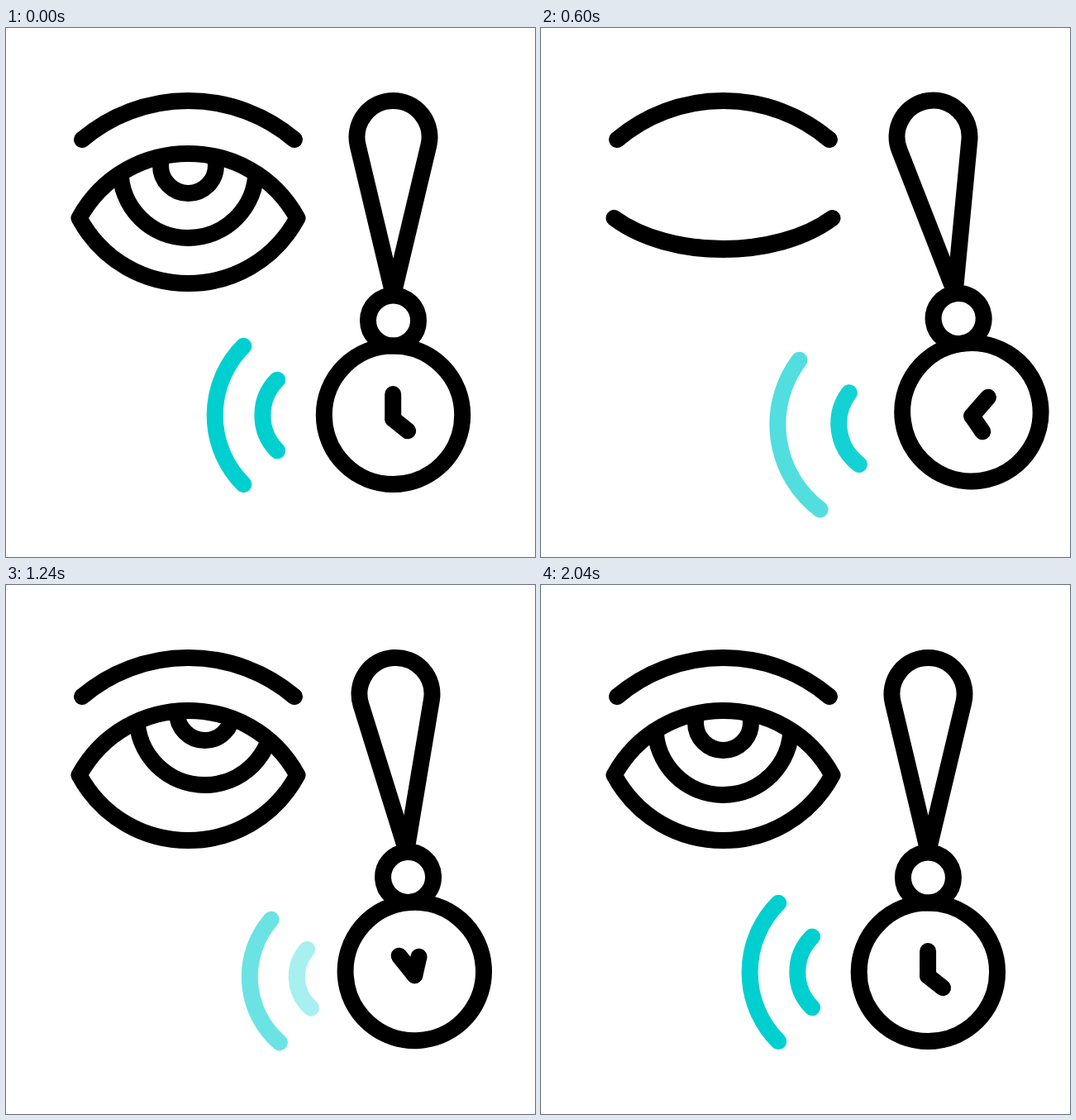
Animation of 640 by 640 pixels, one loop 2120 ms. Source, as an HTML page:

```html
<!DOCTYPE html>
<html lang="en">
<head>
<meta charset="utf-8">
<title>Hypnosis</title>
<style>
  html, body { margin: 0; width: 100%; height: 100%; overflow: hidden; background: #fff; }
  svg { display: block; width: 100%; height: 100%; }
  .line { fill: none; stroke: #000; stroke-width: 20; stroke-linecap: round; stroke-linejoin: round; }
  .wave { stroke: #00cfd0; }
</style>
</head>
<body>
<svg viewBox="0 0 640 640">
  <defs><clipPath id="opening"><path id="openingPath"/></clipPath></defs>

  <path class="line" d="M92 135A199 199 0 0 1 349 135"/>
  <g clip-path="url(#opening)">
    <g id="iris" class="line">
      <circle cx="220.5" cy="172" r="82"/>
      <circle cx="220.5" cy="166.5" r="33.5"/>
    </g>
  </g>
  <path id="lids" class="line"/>

  <g id="pendulum" class="line">
    <path id="outer" class="wave"/>
    <path id="inner" class="wave"/>
    <path d="M468.5 322L425.7 142.2A44 44 0 1 1 511.3 142.2Z"/>
    <circle cx="468.5" cy="354" r="30.5"/>
    <circle cx="468.5" cy="468.3" r="83.7"/>
    <path id="minute" d="M468.2 473V443"/>
    <path id="hour" d="M468.2 473L486.2 487.3"/>
  </g>
</svg>
<script>
  const LOOP = 2120, STEP = 40, REST = 2040;
  const el = id => document.getElementById(id);
  const clamp = x => Math.min(1, Math.max(0, x));
  const mix = (a, b, k) => a + (b - a) * k;
  const smooth = x => x * x * (3 - 2 * x);
  const inOut = (x, p) => x < .5 ? (2 * x) ** p / 2 : 1 - (2 - 2 * x) ** p / 2;

  // Rows: time, easing power of the segment leading here, degrees
  const SWING = [[0, 2, 0], [468, 2, 10], [894, 3, -7.5], [1320, 3, 4.2], [1740, 3, -3], [2080, 3, 0]];
  // Rows: time, x, y
  const GAZE = [[0, 0, 0], [400, 15.5, -11], [960, -44, -9.5], [1240, 20, -12], [1600, 0, 0]];
  const BLINKS = [598, 1587], BLINK_HALF = 150;
  const WAVES = [
    { id: 'outer', r: 118.3, leave: 475, enter: 950 },
    { id: 'inner', r: 60.6, leave: 570, enter: 1070 }
  ];

  function segment(rows, t) {
    let i = 1;
    while (i < rows.length - 1 && t > rows[i][0]) i++;
    const a = rows[i - 1], b = rows[i];
    return { a, b, x: clamp((t - a[0]) / (b[0] - a[0])) };
  }

  function drawEye(t) {
    const shut = Math.max(...BLINKS.map(m => smooth(clamp(1 - Math.abs(t - m) / BLINK_HALF))));
    const lid = sag => 230 + sag * 4 / 3;
    const dx = mix(57.3, 68, shut);
    const up = lid(mix(-78, 37, shut)), low = lid(mix(79, 38, shut));
    const left = 88.5 + dx, right = 352.5 - dx;
    const d = `M88.5 230C${left} ${up} ${right} ${up} 352.5 230C${right} ${low} ${left} ${low} 88.5 230Z`;
    el('lids').setAttribute('d', d);
    el('lids').style.fill = shut > .85 ? '#000' : 'none';
    el('openingPath').setAttribute('d', d);

    const { a, b, x } = segment(GAZE, t), k = smooth(x);
    el('iris').setAttribute('transform', `translate(${mix(a[1], b[1], k)} ${mix(a[2], b[2], k)})`);
  }

  // Waves spread away from the watch, then grow back about a point between arcs and watch
  function drawWave({ id, r, leave, enter }, t) {
    const out = clamp((t - leave) / 390), back = clamp((t - enter) / 500);
    const returning = t >= enter;
    const scale = returning ? mix(.74, 1, back) : 1 + .286 * out;
    const pivot = returning ? 400 : 468.5;
    const h = r * scale * Math.SQRT1_2;
    const x = mix(pivot, 371, scale) - h;
    el(id).setAttribute('d', `M${x} ${468.5 - h}A${r * scale} ${r * scale} 0 0 0 ${x} ${468.5 + h}`);
    el(id).style.opacity = returning ? back : 1 - out;
  }

  function drawPendulum(t) {
    const { a, b, x } = segment(SWING, t);
    const angle = mix(a[2], b[2], inOut(x, b[1]));
    el('pendulum').setAttribute('transform', `rotate(${-angle} 468.5 88)`);
    const turn = (id, span) =>
      el(id).setAttribute('transform', `rotate(${360 * inOut(clamp(t / span), 3.3)} 468.2 473)`);
    turn('minute', 1780);
    turn('hour', 2185);
    WAVES.forEach(w => drawWave(w, t));
  }

  const start = performance.now();
  function tick() {
    const now = (performance.now() - start) % LOOP;
    const t = Math.min(REST, Math.floor(now / STEP) * STEP);
    drawEye(t);
    drawPendulum(t);
    requestAnimationFrame(tick);
  }
  tick();
</script>
</body>
</html>
```
